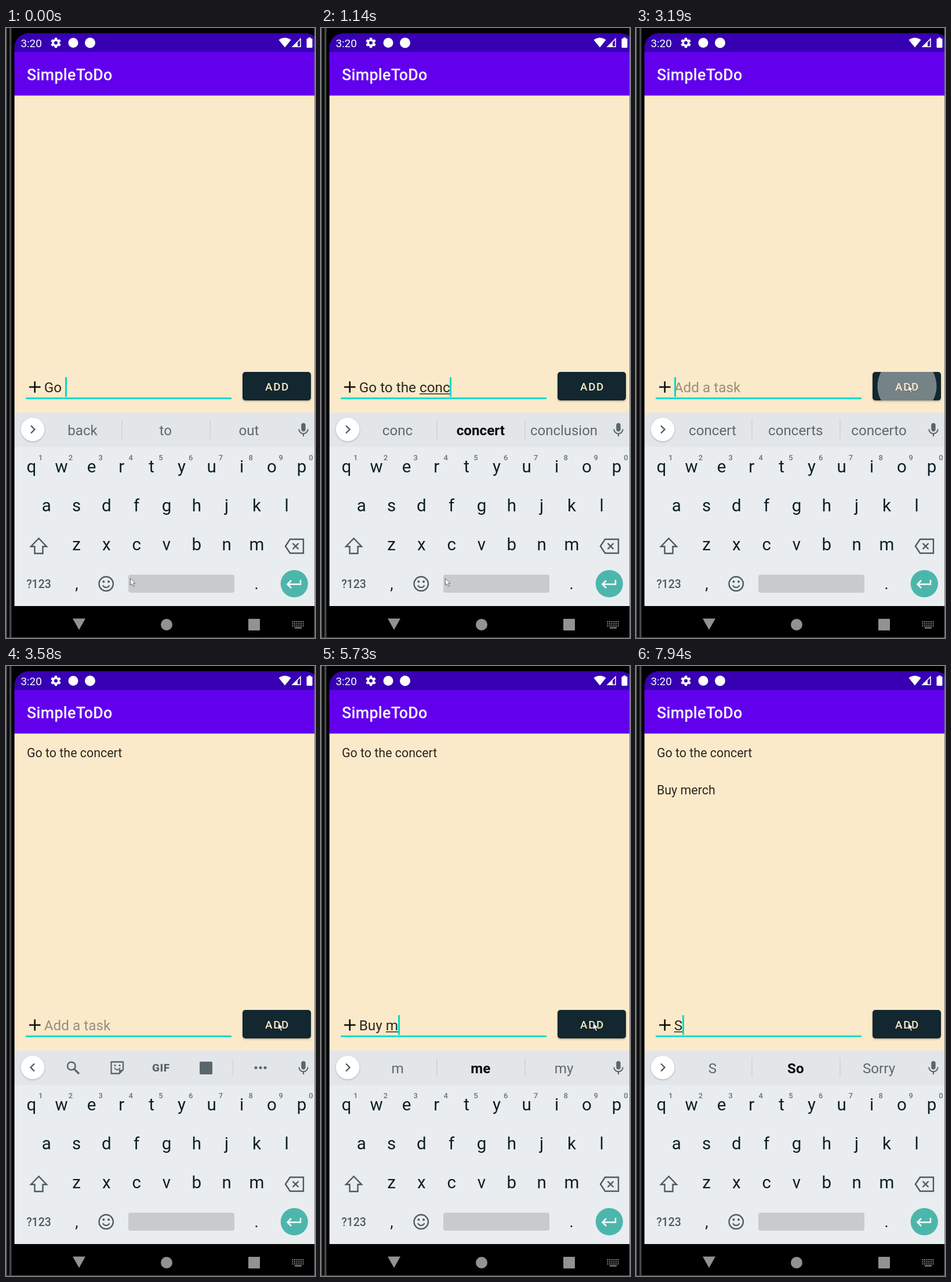
An HTML page with a canvas for the animation above (8 s loop, 533 by 1050 pixels).

```html
<!DOCTYPE html>
<html lang="en">
<head>
<meta charset="utf-8">
<title>To-do list</title>
<style>
  html, body { margin: 0; width: 100%; height: 100%; overflow: hidden; background: #000; }
  canvas { display: block; width: 533px; height: 1050px; }
</style>
</head>
<body>
<canvas id="stage"></canvas>
<script>
const W = 533, H = 1050, LOOP = 8000;
const LEFT = 14.6, SCREEN = 526, MIDDLE = 277;
const CREAM = '#fbeaca', TEAL = '#03dac5', ICON = '#59676d', KEY = '#0d1f27', KEY_ICON = '#4c5a61';
const canvas = document.getElementById('stage');
const dpr = window.devicePixelRatio || 1;
canvas.width = W * dpr;
canvas.height = H * dpr;
const ctx = canvas.getContext('2d');
ctx.scale(dpr, dpr);

// Each entry changes part of the state from its time on.
const TIMELINE = [
  { at: 0, text: 'Go ', words: 'back to out', caret: true, items: 0, ripple: null, mouse: [214, 947] },
  { at: 150, text: 'Go to', words: 'to too tonight' },
  { at: 420, text: 'Go to ', words: 'the a be' },
  { at: 560, text: 'Go to t', words: 't *the this' },
  { at: 710, text: 'Go to the', words: 'the there then' },
  { at: 850, text: 'Go to the ', words: 'store same gym' },
  { at: 1000, text: 'Go to the co', words: 'co *company country' },
  { at: 1140, text: 'Go to the conc', words: 'conc *concert conclusion' },
  { at: 1290, text: 'Go to the conce', words: 'conce *concert concept' },
  { at: 1420, text: 'Go to the concer', words: 'concer *concert concern' },
  { at: 1540, text: 'Go to the concert', words: 'concert concerts concerto' },
  { at: 2100, caret: false, mouse: [284, 800] },
  { at: 2250, mouse: [424, 505] },
  { at: 2400, mouse: [462, 412] },
  { at: 2560, mouse: [466, 462], caret: true },
  { at: 2700, mouse: [470, 537] },
  { at: 2830, mouse: [471, 588] },
  { at: 2930, mouse: [469, 614] },
  { at: 3040, caret: false },
  { at: 3190, text: '', caret: true, ripple: [51, 0.42] },
  { at: 3320, items: 1, words: '', ripple: [66, 0.36] },
  { at: 3450, ripple: [70, 0.12] },
  { at: 3580, ripple: null, caret: false },
  { at: 4140, caret: true },
  { at: 4540, text: 'B', words: 'B *But Before' },
  { at: 4940, text: 'Bu', words: 'Bu *Buy But' },
  { at: 5060, text: 'Buy', words: 'Buy Buying Buyer' },
  { at: 5210, text: 'Buy ', words: 'a the some' },
  { at: 5610, text: 'Buy m', words: 'm *me my' },
  { at: 5740, text: 'Buy mer', words: 'mer *merch mercy' },
  { at: 5880, text: 'Buy merch', words: 'merch merchant merchandise' },
  { at: 6440, text: '', ripple: [51, 0.42] },
  { at: 6590, items: 2, words: '', ripple: [68, 0.25] },
  { at: 6710, ripple: null },
  { at: 7010, caret: false },
  { at: 7510, caret: true },
  { at: 7940, text: 'S', words: 'S *So Sorry' }
];

function stateAt(time) {
  return Object.assign({}, ...TIMELINE.filter(step => step.at <= time));
}

function rect(x, y, w, h, color, radius = 0) {
  ctx.fillStyle = color;
  ctx.beginPath();
  ctx.roundRect(x, y, w, h, radius);
  ctx.fill();
}

function disc(x, y, r, color) {
  ctx.fillStyle = color;
  ctx.beginPath();
  ctx.arc(x, y, r, 0, 7);
  ctx.fill();
}

function ring(x, y, r, color, width, from = 0, to = Math.PI * 2) {
  ctx.strokeStyle = color;
  ctx.lineWidth = width;
  ctx.beginPath();
  ctx.arc(x, y, r, from, to);
  ctx.stroke();
}

function trace(points, closed) {
  ctx.beginPath();
  for (let i = 0; i < points.length; i += 2) ctx.lineTo(points[i], points[i + 1]);
  if (closed) ctx.closePath();
}

function poly(points, color) {
  trace(points, true);
  ctx.fillStyle = color;
  ctx.fill();
}

function line(points, color, width, closed = false) {
  trace(points, closed);
  ctx.strokeStyle = color;
  ctx.lineWidth = width;
  ctx.stroke();
}

function label(str, x, y, size, color, { weight = 400, align = 'left', spacing = 0, max } = {}) {
  ctx.font = `${weight} ${size}px Roboto, sans-serif`;
  ctx.letterSpacing = spacing + 'px';
  ctx.textAlign = align;
  ctx.fillStyle = color;
  ctx.fillText(str, x, y, max);
  ctx.letterSpacing = '0px';
}

function shadow(color, blur, dy) {
  ctx.shadowColor = color;
  ctx.shadowBlur = blur * dpr;
  ctx.shadowOffsetY = dy * dpr;
}

function noShadow() {
  ctx.shadowColor = 'transparent';
}

function drawBezel() {
  rect(0, 0, W, H, '#000');
  rect(0, 0, 1.5, H, '#6d6e70');
  rect(1.5, 0, 4.5, H, '#0c0c0d');
  rect(6, 0, 3, H, '#47484c');
  rect(9, 0, 1, H, '#1c1c1e');
}

function drawStatusBar() {
  rect(LEFT, 9.1, SCREEN, 60, '#3700b3', [24, 24, 0, 0]);
  label('3:20', 25.5, 32.5, 18.8, '#fff');
  ctx.save();
  ctx.translate(86, 25.5);
  ring(0, 0, 4.8, '#fff', 3.6);
  for (let i = 0; i < 6; i++) {
    rect(-2.2, -8.8, 4.4, 4, '#fff', 0.8);
    ctx.rotate(Math.PI / 3);
  }
  ctx.restore();
  disc(116, 25.5, 8.5, '#fff');
  disc(145, 25.5, 9, '#fff');

  ctx.fillStyle = '#fff';
  ctx.beginPath();
  ctx.moveTo(481, 33.5);
  ctx.lineTo(470.5, 20.5);
  ctx.quadraticCurveTo(481, 13, 491.5, 20.5);
  ctx.fill();
  line([494.5, 32.2, 508, 32.2, 508, 18.7], '#fff', 1.6, true);
  poly([493, 33, 503, 33, 503, 23], '#fff');
  rect(518.5, 18, 10, 16, '#fff', 1.5);
  rect(521.5, 16.3, 4, 3, '#fff');
}

function drawHeader() {
  rect(LEFT, 41.2, SCREEN, 75, '#6200ee');
  label('SimpleToDo', 36, 89.5, 26.8, '#fff', { weight: 500, spacing: 0.34 });
}

function drawField({ text, caret }) {
  line([40, 618, 59.5, 618], '#0b0b0b', 2.6);
  line([49.7, 608.3, 49.7, 627.7], '#0b0b0b', 2.6);
  rect(34, 636, 355, 2.7, TEAL);
  const x = 65.7, size = 24.3;
  label(text || 'Add a task', x, 627, size, text ? '#2a2621' : '#988e7b');
  const width = text ? ctx.measureText(text).width : 0;
  if (text && !text.endsWith(' ')) {
    const start = ctx.measureText(text.slice(0, text.lastIndexOf(' ') + 1)).width;
    rect(x + start, 629, width - start, 1.5, '#2a2621');
  }
  if (caret) rect(Math.floor(66 + width), 601, 3, 34, TEAL);
}

function drawButton(ripple) {
  shadow('rgba(0,0,0,.3)', 3, 1.5);
  rect(408, 592, 118, 49, '#12272f', 5);
  noShadow();
  if (ripple) {
    ctx.save();
    ctx.beginPath();
    ctx.roundRect(408, 592, 118, 49, 5);
    ctx.clip();
    disc(467.5, 616.5, ripple[0], `rgba(255,255,255,${ripple[1]})`);
    ctx.restore();
  }
  label('ADD', 447, 624, 18.75, '#f9e9c9', { weight: 500, spacing: 1.67 });
}

function drawMic() {
  rect(509.3, 680, 7.4, 14.5, ICON, 3.7);
  ring(513, 690.5, 7.7, ICON, 2, 0, Math.PI);
  line([513, 698, 513, 703], ICON, 2.2);
}

function drawTools() {
  ring(112.8, 688.5, 6.8, ICON, 2.6);
  line([117.5, 693.5, 126, 702], ICON, 3.2);
  ctx.lineJoin = 'round';
  line([181.5, 681.5, 202, 681.5, 202, 695, 195.5, 701.5, 181.5, 701.5], ICON, 2.3, true);
  ctx.lineJoin = 'miter';
  poly([195, 695, 202, 695, 195, 702], ICON);
  disc(188, 687.5, 1.6, ICON);
  disc(196, 687.5, 1.6, ICON);
  ring(192, 690, 5, ICON, 2, 0.3, Math.PI - 0.3);
  label('GIF', 267.3, 697.5, 19, ICON, { weight: 900, align: 'center', spacing: 0.5 });
  rect(334, 681, 22, 22, ICON, 2);
  rect(391, 677, 1, 29, '#c8cdd0');
  for (const x of [431, 439, 447]) disc(x, 691.5, 2.5, ICON);
}

function drawStrip(words) {
  rect(LEFT, 662, SCREEN, 59, '#e2e6e9');
  shadow('rgba(0,0,0,.25)', 3, 1);
  disc(46, 691, 20.3, '#fff');
  noShadow();
  const dir = words ? 1 : -1;
  line([46 - 3 * dir, 684.5, 46 + 3.5 * dir, 691, 46 - 3 * dir, 697.5], '#4d5b61', 2.3);
  if (words) {
    words.split(' ').forEach((word, i) => {
      const bold = word[0] === '*';
      label(bold ? word.slice(1) : word, [132, 275.3, 419][i], 701, 24.2, bold ? '#04090b' : '#5d696f',
        { weight: bold ? 700 : 400, align: 'center', max: 116 });
    });
    rect(199.5, 675, 1, 32, '#c3c8cb');
    rect(351.5, 675, 1, 32, '#c3c8cb');
  } else {
    drawTools();
  }
  drawMic();
}

function drawKeys() {
  rect(LEFT, 721, SCREEN, 274, '#e9edf0');
  const pitch = 51.8;
  ['qwertyuiop', 'asdfghjkl', 'zxcvbnm'].forEach((letters, row) => {
    const left = MIDDLE - pitch * (letters.length - 1) / 2;
    [...letters].forEach((letter, i) => {
      label(letter, left + pitch * i, 765 + 67 * row, 29.5, KEY, { align: 'center' });
    });
  });
  [...'1234567890'].forEach((digit, i) => {
    label(digit, 59.7 + pitch * i, 744, 13, '#667278', { weight: 500, align: 'center' });
  });

  line([56.5, 878.5, 43, 892.5, 49.5, 892.5, 49.5, 904.5, 63.5, 904.5, 63.5, 892.5, 70, 892.5], KEY_ICON, 2.4, true);
  line([482, 892, 490, 880, 513, 880, 513, 904, 490, 904], KEY_ICON, 2.4, true);
  line([494.5, 887, 504.5, 897], KEY_ICON, 2.4);
  line([504.5, 887, 494.5, 897], KEY_ICON, 2.4);

  label('?123', 56.5, 964, 19.5, '#4b5960', { weight: 500, align: 'center' });
  label(',', 122, 966, 27, KEY, { align: 'center' });
  label('.', 432, 966, 27, KEY, { align: 'center' });
  ring(172.7, 956.7, 12.2, KEY_ICON, 2.4);
  disc(168.4, 953, 2, KEY_ICON);
  disc(177, 953, 2, KEY_ICON);
  ring(172.7, 957, 6, KEY_ICON, 2.2, 0.35, Math.PI - 0.35);
  rect(211, 941, 183, 31, '#c7cbce', 4);

  disc(497.3, 956.5, 23.6, '#4db6ac');
  line([508, 950, 508, 957.5, 487, 957.5], '#fff', 2.5);
  line([492, 951, 485.5, 957.5, 492, 964], '#fff', 2.5);
}

function drawNavBar() {
  const gray = '#929292';
  rect(LEFT, 995, SCREEN, 55, '#000');
  poly([115, 1016.5, 137, 1016.5, 126, 1036], gray);
  disc(MIDDLE, 1027, 10, gray);
  rect(418, 1017, 20, 20, gray, 1);
  for (let row = 0; row < 3; row++) {
    for (let i = 0; i < 6; i++) rect(493.5 + 3.6 * i, 1021 + 3.6 * row, 2, 2, gray);
  }
  rect(498, 1031.5, 12, 2, gray);
}

function drawWindowEdge() {
  rect(0, 1049, W, 1, '#58595b');
  rect(532, 0, 1, H, '#7c7c7c');
}

function drawMouse([x, y]) {
  ctx.save();
  ctx.translate(x + 0.5, y + 0.5);
  const arrow = [0, 0, 0, 11.5, 2.7, 9.1, 4.7, 13.8, 6.7, 12.9, 4.8, 8.4, 8.5, 8.3];
  poly(arrow, '#fff');
  line(arrow, 'rgba(20,20,20,.75)', 0.8, true);
  ctx.restore();
}

function draw(time) {
  const state = stateAt(time);
  drawBezel();
  drawStatusBar();
  drawHeader();
  rect(LEFT, 116.2, SCREEN, 546, CREAM);
  ['Go to the concert', 'Buy merch'].slice(0, state.items).forEach((item, i) => {
    label(item, 36, 156.5 + 64.3 * i, 21.4, '#2a2621');
  });
  drawField(state);
  drawButton(state.ripple);
  drawStrip(state.words);
  drawKeys();
  drawNavBar();
  drawWindowEdge();
  drawMouse(state.mouse);
}

const start = performance.now();
function tick() {
  draw((performance.now() - start) % LOOP);
  requestAnimationFrame(tick);
}
tick();
</script>
</body>
</html>
```
